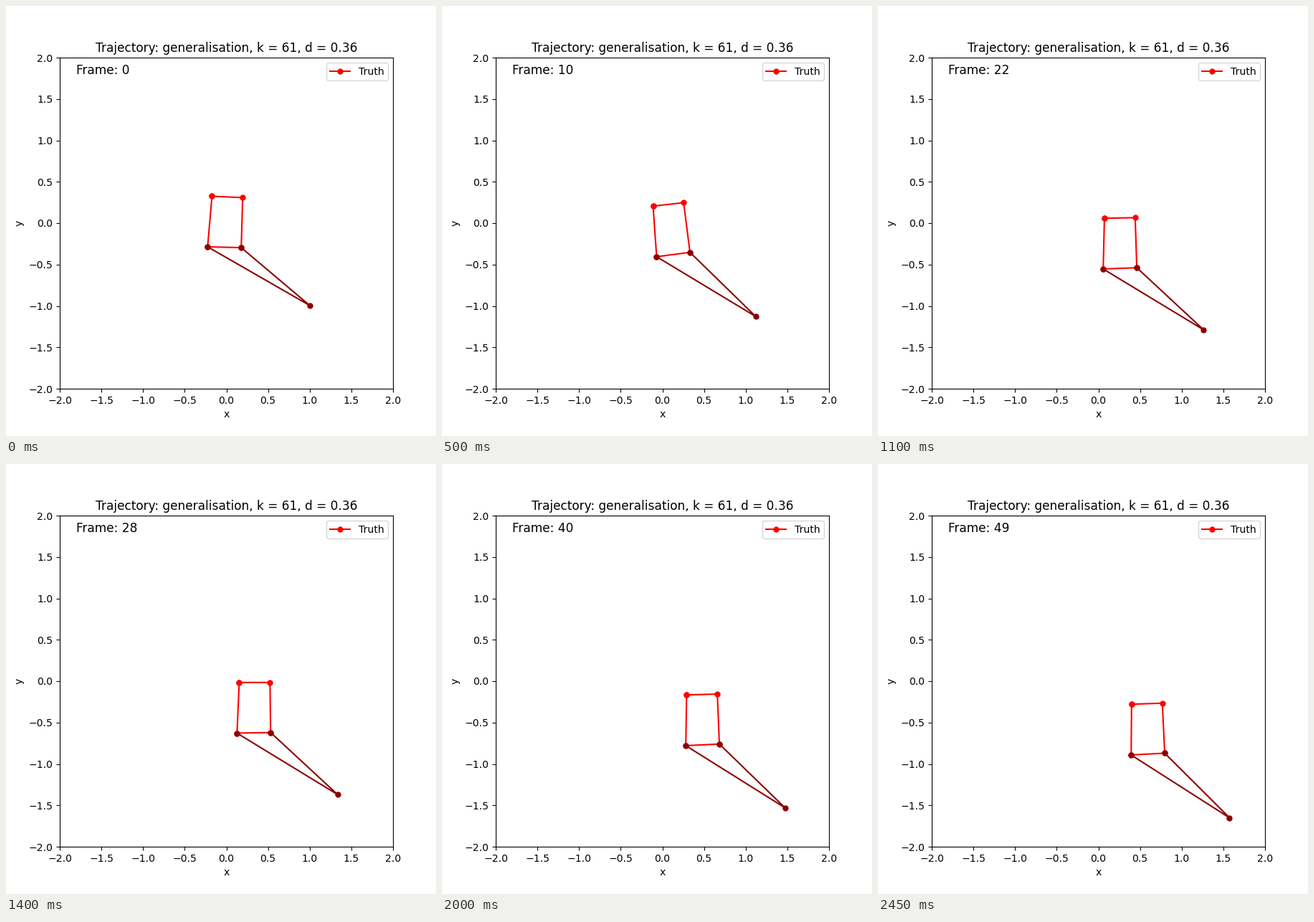
Write a matplotlib script that moves like this. It is 600 by 600 pixels and loops after 2.5 s.

```python
import numpy as np
import matplotlib.pyplot as plt
from matplotlib.animation import FuncAnimation

FRAMES, INTERVAL = 50, 50

# Sizes that give whole-pixel glyph heights (14 and 17 px) at 100 dpi
SMALL, LARGE = 14 * 0.72, 17 * 0.72
plt.rcParams.update({"font.size": SMALL, "axes.titlesize": LARGE,
                     "lines.markersize": 5})

# Corners of the box at rest, around its centre:
# top left, top right, bottom right, bottom left
REST = np.array([[-.188, .300], [.181, .3095], [.205, -.2945], [-.198, -.313]])


def box(t):
    """Box that drifts while a damped swing turns and nudges it."""
    swing = 2.8 * np.exp(-t / 16) * np.sin(0.17 * (t - 2.5))
    angle = 0.06 * swing
    c, s = np.cos(angle), np.sin(angle)
    centre = np.array([-.013 + .0123 * t - .006 * swing,
                       .034 - .0125 * t + .010 * swing
                       - .010 * np.exp(-t / 2)])
    return REST @ np.array([[c, s], [-s, c]]) + centre


def tip(t):
    return np.array([1 + .0122 * t - 1e-5 * t * t, -.994 - .0134 * t])


fig = plt.figure(figsize=(6, 6), dpi=100)
ax = fig.add_axes([0.125, 0.11, 0.775, 0.77])
ax.set(xlim=(-2, 2), ylim=(-2, 2), xlabel="x", ylabel="y",
       title="Trajectory: generalisation, k = 61, d = 0.36")

body, = ax.plot([], [], "o-", color="red", label="Truth")
arm, = ax.plot([], [], "o-", color="darkred")
counter = ax.text(-1.8, 1.8, "", fontsize=LARGE)
ax.legend(loc="upper right")


def update(step):
    corners = box(step)
    body.set_data(*corners[[0, 1, 2, 3, 0]].T)
    arm.set_data(*np.array([corners[2], tip(step), corners[3]]).T)
    counter.set_text(f"Frame: {step}")
    return body, arm, counter


anim = FuncAnimation(fig, update, frames=FRAMES, interval=INTERVAL,
                     repeat=True, repeat_delay=0)
plt.show()
```
